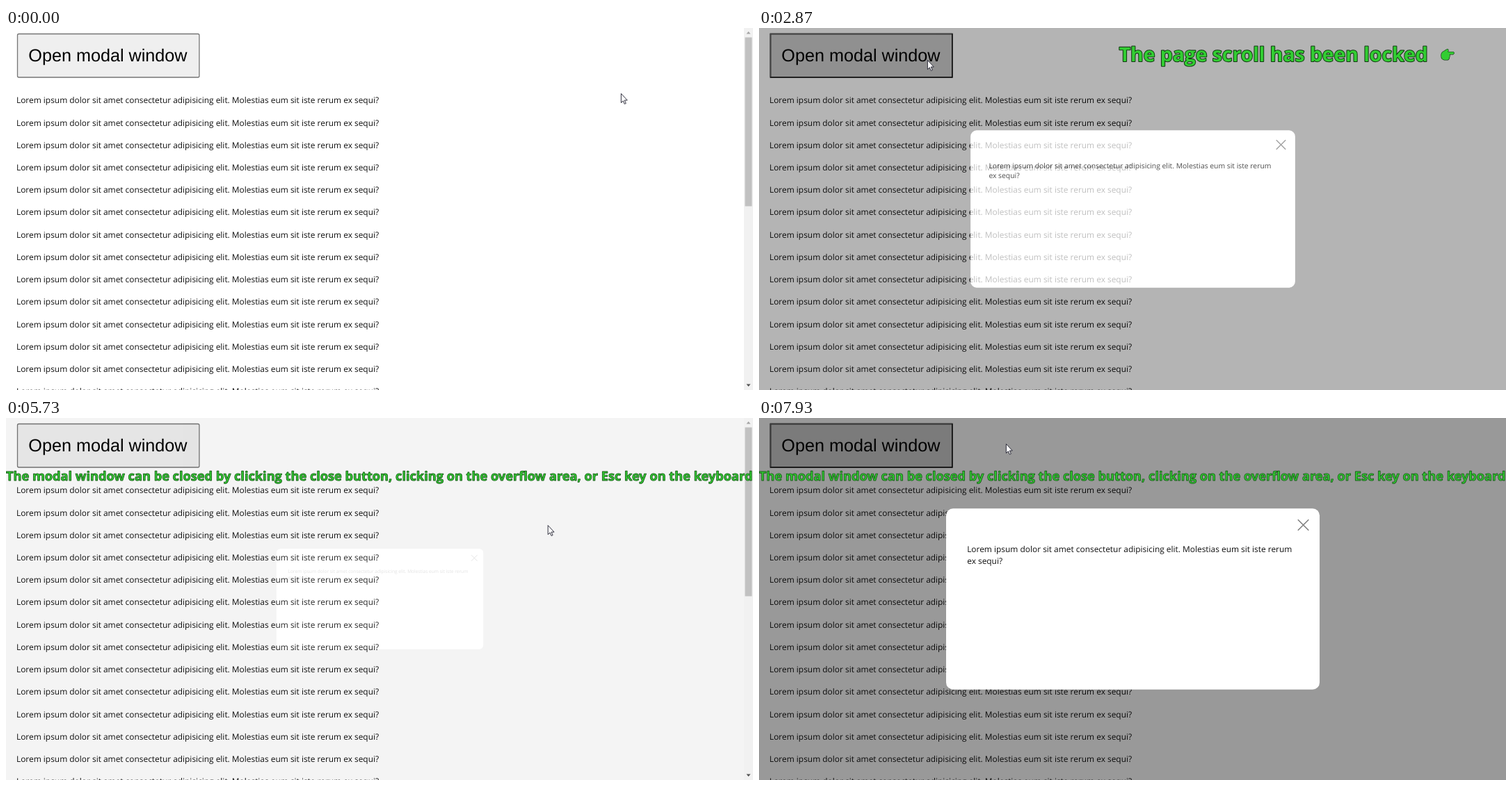
An HTML page for the animation above (8000 ms loop, 1074 by 521 pixels).

```html
<!DOCTYPE html>
<html lang="en">
<head>
<meta charset="utf-8">
<title>Modal window demo</title>
<style>
  html, body { margin: 0; width: 100%; height: 100%; overflow: hidden; background: #fff; }
  svg { display: block; }
  text { text-rendering: geometricPrecision; white-space: pre; }
  .body { font: 11.91px "Open Sans", "Noto Sans", sans-serif; fill: #101010; }
  .label { font: 25.2px "Liberation Sans", Arial, sans-serif; }
  .caption { font: bold 28.3px "Open Sans", "Noto Sans", sans-serif;
    fill: #32cd32; stroke: #123412; stroke-width: 2; stroke-linejoin: round; paint-order: stroke; }
  .small { font-size: 18.19px; stroke: #1a5c1a; stroke-width: .9; paint-order: normal; }
</style>
</head>
<body>
<svg width="1074" height="521" viewBox="0 0 1074 521">
  <defs>
    <path id="hand" d="M0 8Q.5 4.500 4 3.200Q7 1 9 .3Q11 1.500 9 4.300H17Q19.500 5.700 17 7.500H11.500Q12.800 8.500 11.700 9.800Q12.500 11.300 11.200 12.200Q11.500 14.800 9 15.500H4.500Q0 15 0 10Z"/>
  </defs>

  <rect id="face" x="16.500" y="8.500" width="261.400" height="62.500"/>
  <path id="bevel" d="M16.500 70.500V8.500H277.500" fill="none" stroke="#606060" stroke-width="1.600"/>
  <text class="label" x="32.300" y="48">Open modal window</text>
  <g id="lines" class="body"></g>

  <g id="overlay">
    <rect width="1074" height="521" fill-opacity=".4"/>
    <g id="modal">
      <rect x="269" y="130.300" width="537" height="260.400" rx="10" fill="#fff"/>
      <path id="cross" d="M774.800 146.300l15.500 15.500m0-15.500l-15.500 15.500" stroke-width="1.600"/>
      <g class="body">
        <text x="299.200" y="193.300">Lorem ipsum dolor sit amet consectetur adipisicing elit. Molestias eum sit iste rerum</text>
        <text x="299.200" y="209.800">ex sequi?</text>
      </g>
    </g>
  </g>

  <g id="scrollbar">
    <rect x="1061" width="13" height="521" fill="#f1f1f1"/>
    <rect x="1062.500" y="13.500" width="10" height="243" fill="#c1c1c1"/>
    <path d="M1064.500 8.500h6l-3-3.500z" fill="#a3a3a3"/>
    <path d="M1064.500 512.500h6l-3 3.500z" fill="#505050"/>
  </g>

  <path id="cursor" d="M.4.4V13.600L3.300 10.800L5.300 15.400L7.300 14.500L5.300 10H9.300Z" fill="#fff" stroke="#1c1c2c" stroke-width=".9"/>

  <g id="clickCaption" class="caption">
    <use href="#hand" transform="translate(349 31) scale(-1 1)" stroke-width="1.300"/>
    <text x="365" y="48.700">Click the button to open the modal window</text>
  </g>
  <g id="lockCaption" class="caption">
    <text x="517.700" y="48.200">The page scroll has been locked</text>
    <use href="#hand" transform="translate(981 30.300)" stroke-width="1.300"/>
  </g>
  <text id="closeCaption" class="caption small" x="0" y="89.800">The modal window can be closed by clicking the close button, clicking on the overflow area, or Esc key on the keyboard</text>
</svg>

<script>
const LOOP = 8000, FADE = 500;
const $ = id => document.getElementById(id);
const show = (id, on) => $(id).setAttribute('visibility', on ? 'visible' : 'hidden');
const set = (id, attrs) => {
  for (const name in attrs) $(id).setAttribute(name, attrs[name]);
};

const sentence = 'Lorem ipsum dolor sit amet consectetur adipisicing elit. Molestias eum sit iste rerum ex sequi?';
$('lines').innerHTML = Array.from({ length: 14 }, (_, i) =>
  `<text x="15" y="${108.300 + i * 32.230}">${sentence}</text>`).join('');

// Cursor stops: time, x, y
const stops = [
  [0, 884, 94], [830, 884, 94], [1330, 421, 18], [1670, 242, 46], [3420, 242, 46],
  [3730, 528, 65], [4300, 1035, 96], [4420, 1035, 96], [4870, 783, 155], [5680, 783, 155],
  [6670, 236, 42], [7680, 236, 42], [7930, 355, 37], [LOOP, 355, 37]
];

// Monotone cubic through the stops, at rest wherever the direction turns
function track(t, axis) {
  const secant = i => stops[i + 1]
    ? (stops[i + 1][axis] - stops[i][axis]) / (stops[i + 1][0] - stops[i][0]) : 0;
  const slope = i => {
    const a = i ? secant(i - 1) : 0, b = secant(i);
    return a * b > 0 ? 2 * a * b / (a + b) : 0;
  };
  let i = 0;
  while (i < stops.length - 2 && t >= stops[i + 1][0]) i++;
  const [p, q] = [stops[i], stops[i + 1]], h = q[0] - p[0], u = (t - p[0]) / h, v = 1 - u;
  return p[axis] * (1 + 2 * u) * v * v + q[axis] * u * u * (3 - 2 * u)
    + h * u * v * (slope(i) * v - slope(i + 1) * u);
}

// CSS "ease": cubic-bezier(.25, .1, .25, 1)
function ease(x) {
  if (x <= 0) return 0;
  if (x >= 1) return 1;
  const bezier = (s, a, b) => 3 * (1 - s) ** 2 * s * a + 3 * (1 - s) * s * s * b + s ** 3;
  let low = 0, high = 1;
  for (let i = 0; i < 24; i++) {
    const mid = (low + high) / 2;
    if (bezier(mid, .25, .25) < x) low = mid; else high = mid;
  }
  return bezier(low, .1, 1);
}

function draw(t) {
  const fade = start => ease((t - start) / FADE);
  const open = fade(2650) - fade(5426) + fade(7015);
  const locked = t >= 2600 && t < 5426 || t >= 7010;
  const x = track(t, 1), y = track(t, 2);
  const overButton = x > 16 && x < 279 && y > 8 && y < 72;
  const overCross = x > 773 && x < 791 && y > 145 && y < 163;

  set('face', {
    fill: locked ? '#ccc' : overButton ? '#e5e5e5' : '#efefef',
    stroke: locked ? '#000' : '#767676',
    'stroke-width': locked ? 1.6 : 1.3,
    rx: locked ? 0 : 2
  });
  show('bevel', locked);
  show('scrollbar', !locked);

  const scale = .5 + open / 2;
  set('overlay', { opacity: open });
  set('modal', { transform: `translate(537.500 260.500) scale(${scale}) translate(-537.500 -260.500)` });
  set('cross', { stroke: overCross ? '#000' : '#808080' });
  set('cursor', { transform: `translate(${x} ${y})` });

  show('clickCaption', t >= 670 && t < 2070);
  show('lockCaption', t >= 2600 && t < 5270);
  show('closeCaption', t >= 5270);
}

function tick() {
  draw(performance.now() % LOOP);
  requestAnimationFrame(tick);
}
tick();
</script>
</body>
</html>
```
